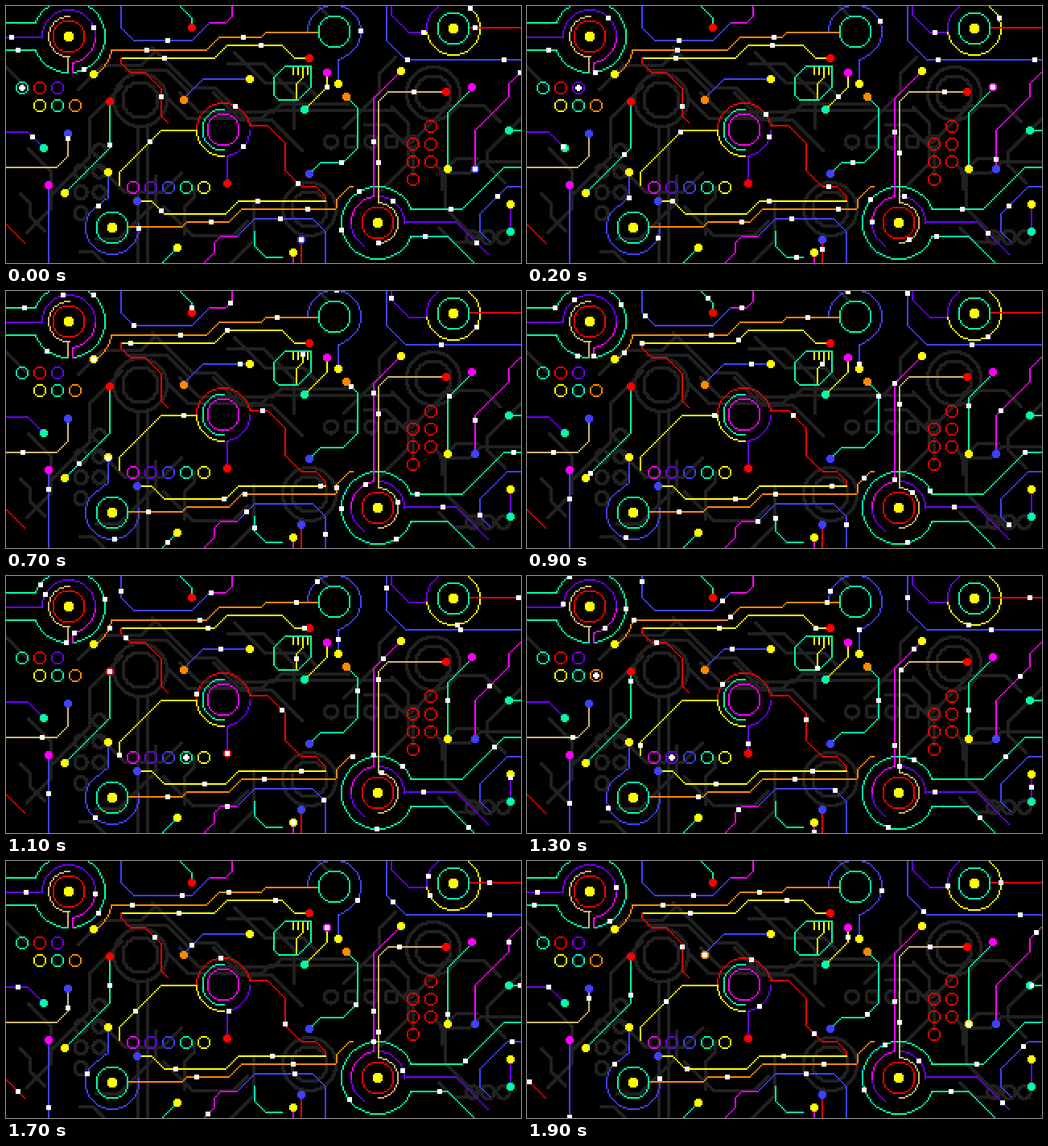
Recreate the animation shown at these times as an HTML page with a canvas. Size 640 px wide and 320 px high, loop 2 s.

```html
<!DOCTYPE html>
<html lang="en">
<head>
<meta charset="utf-8">
<title>Circuit traces</title>
<style>
html, body { margin: 0; width: 100%; height: 100%; overflow: hidden; background: #000; }
canvas { display: block; width: 640px; height: 320px; image-rendering: pixelated; }
</style>
</head>
<body>
<canvas id="stage" width="320" height="160"></canvas>
<script>
const ctx = document.getElementById('stage').getContext('2d');
const board = document.createElement('canvas');
board.width = 320;
board.height = 160;
const ink = board.getContext('2d');

const colors = {
  red: '#ff0000', yellow: '#ffff00', green: '#00ffa8', blue: '#4040ff', purple: '#6a00ff',
  magenta: '#ff00ff', orange: '#ff8800', tan: '#ceb56e', grey: '#212121'
};
const SPACING = 60, SPEED = 3, STEPS = 20;
const pulses = [], leds = [], pads = [];

// Turns a route into a chain of 2px cells. Its parts are points "x,y", compass moves
// "NE16" and arcs "@cx,cy,r,from,to"; "*color" after a part puts a pad there.
function walk(route) {
  const cells = [];
  let pos = null;
  const add = (x, y) => {
    const cell = [Math.floor(x / 2), Math.floor(y / 2)];
    const end = cells[cells.length - 1];
    if (!end || end[0] !== cell[0] || end[1] !== cell[1]) cells.push(cell);
  };
  const lineTo = (x, y) => {
    const [x0, y0] = pos || [x, y];
    const n = Math.max(1, Math.round(Math.max(Math.abs(x - x0), Math.abs(y - y0)) / 2));
    for (let i = 0; i <= n; i++) add(x0 + (x - x0) * i / n, y0 + (y - y0) * i / n);
    pos = [x, y];
  };
  // Along its longer axis an arc advances one cell at a time.
  const arc = (cx, cy, r, from, to) => {
    for (let i = 0; i <= 720; i++) {
      const a = (from + (to - from) * i / 720) * Math.PI / 180;
      const snap = v => 2 * Math.floor(v / 2) + 1;
      let x = cx + r * Math.cos(a), y = cy + r * Math.sin(a);
      if (Math.abs(x - cx) < Math.abs(y - cy)) {
        x = snap(x);
        y = cy + Math.sign(y - cy) * Math.sqrt(r * r - (x - cx) ** 2);
      } else {
        y = snap(y);
        x = cx + Math.sign(x - cx) * Math.sqrt(r * r - (y - cy) ** 2);
      }
      add(x, y);
      pos = [x, y];
    }
  };
  for (const part of route.split(' ')) {
    const [step, pad] = part.split('*');
    const move = step.match(/^([NESW]+)(\d+)$/);
    if (move) {
      const along = (plus, minus) => (move[1].includes(plus) - move[1].includes(minus)) * move[2];
      lineTo(pos[0] + along('E', 'W'), pos[1] + along('S', 'N'));
    } else if (step[0] === '@') {
      arc(...step.slice(1).split(',').map(Number));
    } else {
      lineTo(...step.split(',').map(Number));
    }
    if (pad) pads.push([pad, ...pos]);
  }
  return cells;
}

// "start" is the distance clock at which a pulse enters the route.
function trace(color, route, start, size = 1) {
  const cells = walk(route);
  ink.fillStyle = colors[color];
  for (const [x, y] of cells) ink.fillRect(x, y, size, size);
  if (start !== undefined) pulses.push({ cells, start });
}

const ring = (color, x, y, r, size) => trace(color, `@${x},${y},${r},0,360`, undefined, size);

function dot(color, x, y, r = 5) {
  ink.fillStyle = colors[color];
  for (let px = Math.floor((x - r) / 2); px <= (x + r) / 2; px++) {
    for (let py = Math.floor((y - r) / 2); py <= (y + r) / 2; py++) {
      if (Math.hypot(px * 2 + 1 - x, py * 2 + 1 - y) <= r) ink.fillRect(px, py, 1, 1);
    }
  }
}

function hub(color, x, y) {
  ring(color, x, y, 20);
  dot('yellow', x, y, 7);
}

function led(color, x, y, step) {
  ring(color, x, y, 7);
  leds.push({ x: x / 2, y: y / 2, step });
}

// Dim board: seeded random traces, two buses, sockets and vias
let seed = 11;
const random = n => (seed = (seed * 16807) % 2147483647) % n;
const compass = ['N', 'NE', 'E', 'SE', 'S', 'SW', 'W', 'NW'];
for (let i = 0; i < 26; i++) {
  let heading = random(8), route = `${random(320) * 2 + 1},${random(160) * 2 + 1}`;
  for (let leg = 0; leg < 3; leg++) {
    route += ` ${compass[heading]}${12 + 2 * random(20)}`;
    heading = (heading + (random(2) ? 1 : 7)) % 8;
  }
  trace('grey', route, undefined, 2);
}
for (let i = 0; i < 2; i++) {
  trace('grey', `${163 + i * 12},151 S168`, undefined, 2);
  trace('grey', `${215 - i * 14},${107 + i * 8} SE24 E92 NE10 E${84 + i * 72}`, undefined, 2);
}
for (const [x, y] of [[166, 116], [530, 108], [376, 252]]) {
  ring('grey', x, y, 22, 2);
  ring('grey', x, y, 33, 2);
}
for (let i = 0; i < 5; i++) ring('grey', 403 + i * 25, 168, 8, 2);
for (let i = 0; i < 3; i++) {
  ring('grey', 92, 205 + i * 26, 8, 2);
  ring('grey', 115, 179 + i * 26, 8, 2);
  ring('grey', 579 + i * 19, 287, 8, 2);
}

// Top left hub
trace('green', '1,55 E36 @78,38,45,158,92', -7);
trace('green', '1,21 E36 @78,38,45,202,270', 10);
trace('green', '@78,38,45,270,442', 5);
trace('tan', '77,81 N18 @78,38,25,90,270');
trace('magenta', '83,83 N12 @78,38,33,81,0', 26);
trace('purple', '@78,38,33,0,-180 45,39 W44', 54);
hub('red', 78, 38);

// Top row
trace('magenta', '281,1 S12 SW8 W20', 14);
trace('blue', '253,21 SW22 W72 NW16 N26', 34);
trace('green', '231,27*red N12 NW14', 18);
trace('orange', '109,85*yellow 115,83 121,77 129,65 131,55 E118 NE16 E52 NE6 E64', 21);
trace('yellow', '377,65*red W18 NW16 W68 SW16 W116', 30);
trace('red', '143,65 S6 SE12 E18 SE20 S34 SE8', 27);
ring('green', 408, 32, 20);
trace('blue', '413,97*yellow N30 421,63 @408,32,33,62,-180', 24);

// Top right hub
trace('purple', '@556,28,33,-115,-189 523,33 W22 NW22 N10', 39);
trace('yellow', '@556,28,33,-55,170', 59);
trace('red', '639,27 W62', 32);
trace('blue', '473,1 S42 SE24 E142', 26);
hub('green', 556, 28);

// Chip
trace('green', '333,89 NE14 E32 S26 SW16 W24 NW6 N22');
for (const x of [357, 363, 375]) trace('yellow', `${x},77 S8`);
trace('yellow', '369,77 S12 SW8 S18', 20);

// Middle
trace('yellow', '399,83*magenta S18 SW28*green', -9);
trace('blue', '303,91*yellow W58 SW24 S2*orange', 15);
trace('green', '129,119*red S58 SW56*yellow', 33);
trace('yellow', '141,223 N16 NE52 E44', 33);
trace('red', '@270,154,33,180,352 303,149 E22 SE22 S34 SE20 E18 SE12 S6', 29);
trace('yellow', '397,243 W108 SW16 W76 NW16 W18*blue', 18);
trace('yellow', '@270,154,33,180,90');
trace('green', '@270,154,26,270,90');
trace('purple', '275,221*red N34 @270,154,33,81,0', 33);
ring('magenta', 270, 154, 20);
trace('green', '423,113*orange SE14 S50 SW18 W28 SW14*blue', 18);

// Left side
trace('purple', '1,157 E26 SE20*green', -16);
trace('tan', '1,201 E62 NE14 N28*blue', 11);
trace('blue', '53,223*magenta S96', 9);
trace('red', '23,295 NW22', 47);
trace('blue', '@132,276,33,-10,225 121,243 127,239 N32*yellow', -3);
trace('orange', '153,275 E66 NE6 E52 NE16 E116 411,251 N10 NE16 E4', 9);
hub('green', 132, 276);

// Bottom row
trace('blue', '397,319 N38 NW16 W72 SW22', 13);
trace('magenta', '287,287 W20 SW8 S12 SW12', 27);
trace('red', '367,291*blue S28', 0);
trace('magenta', '357,307*yellow S12', 33);
trace('green', '343,313 W20 NW14 N18', 2);
trace('green', '213,301*yellow SW18', 15);

// Bottom right hub
trace('green', '639,201 W20 SW52 W64 @462,270,45,-22,-180', 17);
trace('green', '581,319 NW32 W46 @462,270,45,22,180', 30);
trace('purple', '599,309 NW40 W64 @462,270,33,0,-90', -7);
trace('purple', '@462,270,33,120,180');
trace('magenta', '@462,270,33,180,261 457,237 N122 NE34*yellow', 5);
trace('tan', '@462,270,25,90,-90 463,245 N126 NE12 E72*red', 0);
hub('red', 462, 270);

// Right side
trace('green', '579,101*magenta S2 SW30 S70*yellow', 6);
trace('magenta', '583,203*blue N48 NE42 N16 NE14', 0);
trace('green', '639,155 W14*green', 51);
trace('blue', '639,225 W16 SW34 S22 SE12', 46);
trace('purple', '627,247*yellow S34*green', 31);

// Indicator rings
['magenta', 'purple', 'blue', 'green', 'yellow'].forEach((c, i) => led(c, 158 + i * 22, 226, 14 - i));
['green', 'red', 'purple'].forEach((c, i) => led(c, 20 + i * 22, 102, i));
['yellow', 'green', 'orange'].forEach((c, i) => led(c, 42 + i * 22, 124, 15 - i));
for (let i = 0; i < 3; i++) {
  led('red', 528, 150 + i * 22);
  led('red', 506, 172 + i * 22);
}

for (const pad of pads) dot(...pad);

function draw(now) {
  const step = Math.floor(now / 100) % STEPS;
  ctx.clearRect(0, 0, 320, 160);
  ctx.drawImage(board, 0, 0);
  ctx.fillStyle = '#fff';
  for (const { cells, start } of pulses) {
    const first = ((SPEED * step - start) % SPACING + SPACING) % SPACING;
    for (let i = first; i < cells.length; i += SPACING) {
      ctx.fillRect(cells[i][0] - 1, cells[i][1] - 1, 3, 3);
    }
  }
  for (const { x, y } of leds.filter(led => led.step === step)) {
    ctx.fillRect(x - 2, y - 1, 4, 2);
    ctx.fillRect(x - 1, y - 2, 2, 4);
  }
}

const origin = performance.now();
function tick() {
  draw(performance.now() - origin);
  requestAnimationFrame(tick);
}
tick();
</script>
</body>
</html>
```
